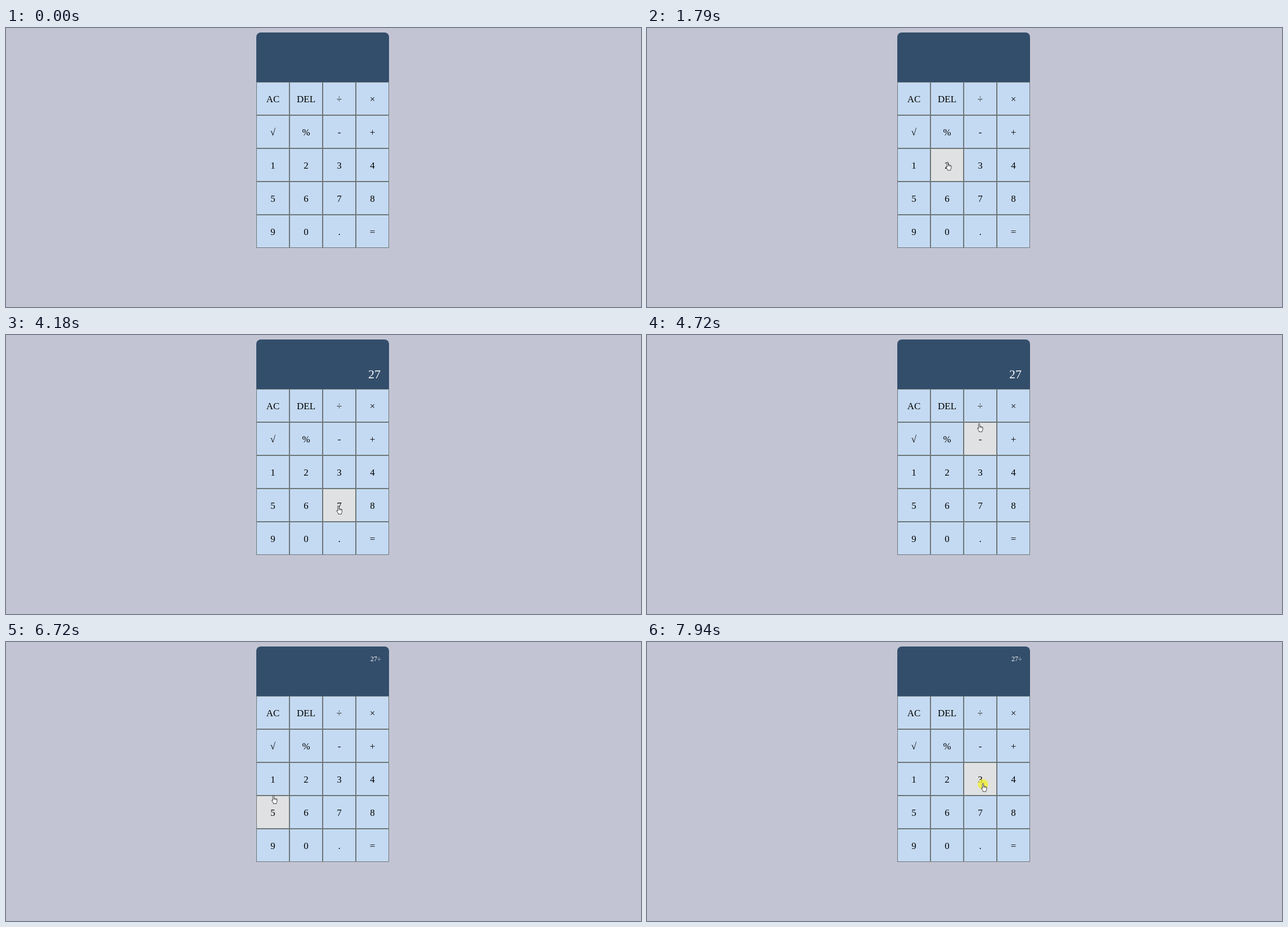
An HTML page for the animation above (8000 ms loop, 1129 px wide and 496 px high).

```html
<!DOCTYPE html>
<html lang="en">
<head>
<meta charset="utf-8">
<title>Calculator</title>
<style>
  html, body { margin: 0; width: 100%; height: 100%; overflow: hidden; background: #c3c4d3; }
  svg { display: block; width: 1129px; height: 496px; }
  text { font-family: "Liberation Serif", "Times New Roman", serif; }
  .key rect { fill: #c4daf2; stroke: #6d7678; stroke-width: 1; }
  .key text { font-size: 17px; text-anchor: middle; fill: #000; }
  .out { fill: #fff; text-anchor: end; }
  #arrow, #hand { fill: #fff; stroke: #111; stroke-width: .8; stroke-linejoin: round; stroke-linecap: round; }
</style>
</head>
<body>
<svg viewBox="0 0 1129 496">
  <path d="M445 97V16a8 8 0 0 1 8-8h220a8 8 0 0 1 8 8v81z" fill="#334e6b"/>
  <text id="previous" class="out" x="666.5" y="34" font-size="12"></text>
  <text id="current" class="out" x="666" y="77" font-size="22"></text>
  <g id="keys"></g>
  <g id="pointer">
    <circle id="click" cy="1.5" r="9.2" fill="#f2f02e" fill-opacity=".78"/>
    <path id="arrow" d="M.4 .4V10.6L2.8 8.4 4.4 12 6 11.3 4.4 7.8H7.6z"/>
    <g id="hand">
      <path d="M-1.2 8.3V.9a1.1 1.1 0 0 1 2.2 0V5.2Q2.6 4 2.9 5.6 4.4 4.6 4.7 6 6.4 5.4 6.4 7V10q0 1.6-1.1 2.8V14.4H-.2V13Q-1.5 11.5-3.2 8.5-2.8 6.8-1.2 8.3z"/>
      <path d="M1 5.2V7.6M2.9 5.6V7.6M4.7 6V7.8" fill="none" stroke-width=".6"/>
    </g>
  </g>
</svg>
<script>
const LOOP = 8000, FADE = 140;
const LEFT = 445, TOP = 96, SIZE = 59, COLS = 4, ROWS = 5;
const BASE = [196, 218, 242], LIT = [224, 225, 226];
const $ = id => document.getElementById(id);

// Each move: start, end, step count, then waypoints [step, x, y]
const moves = [
  [420, 690, 5, [0, 969, 483], [4, 739, 368]],
  [1030, 1790, 12, [0, 726, 358], [5, 482, 192], [7, 480, 208], [11, 534.5, 238.5]],
  [3180, 3840, 11, [0, 555, 250], [3, 589.5, 269.5], [10, 591, 304]],
  [4380, 5070, 11, [0, 591, 290], [5, 590.5, 124.5], [10, 590, 114]],
  [5530, 6300, 12, [0, 590, 110], [7, 580.5, 299.5], [11, 521.5, 318]],
  [6370, 7130, 12, [0, 514, 312], [5, 475.5, 273], [11, 476, 238.5]],
  [7190, 7940, 12, [0, 480, 250], [2, 495, 285], [6, 628, 298], [8, 612, 265], [11, 597.5, 251.5]]
];
const clicks = [[2520, 2650], [4050, 4180], [5070, 5230], [7940, LOOP]];

const keys = ["AC", "DEL", "÷", "×", "√", "%", "-", "+", ..."1234567890.="].map((label, i) => {
  const x = LEFT + i % COLS * SIZE, y = TOP + Math.floor(i / COLS) * SIZE;
  const key = make("g", { class: "key" }, $("keys"));
  const rect = make("rect", { x: x + .5, y: y + .5, width: SIZE - 1, height: SIZE - 1 }, key);
  make("text", { x: x + SIZE / 2, y: y + SIZE / 2 + 6 }, key).textContent = label;
  return rect;
});

function make(tag, attrs, parent) {
  const el = document.createElementNS("http://www.w3.org/2000/svg", tag);
  for (const name in attrs) el.setAttribute(name, attrs[name]);
  return parent.appendChild(el);
}

function position(t) {
  const move = moves.filter(m => m[0] <= t).pop();
  if (!move) return null;
  const [start, end, count, ...points] = move;
  const gap = (end - start) / (count - 1);
  const step = Math.min(count - 1, Math.floor((t - start) / gap + .05));
  const i = points.findIndex(p => p[0] >= step);
  const b = points[i], a = points[i - 1] || b;
  const u = a === b ? 0 : (step - a[0]) / (b[0] - a[0]);
  return [a[1] + (b[1] - a[1]) * u, a[2] + (b[2] - a[2]) * u];
}

function keyAt(t) {
  const p = position(t);
  if (!p) return -1;
  const col = Math.floor((p[0] - LEFT) / SIZE), row = Math.floor((p[1] - TOP) / SIZE);
  return col >= 0 && col < COLS && row >= 0 && row < ROWS ? row * COLS + col : -1;
}

// A key brightens while the pointer stays on it and resets at once
function glow(t, key) {
  let dwell = 0;
  while (dwell < FADE && keyAt(t - dwell - 5) === key) dwell += 5;
  return Math.min(1, dwell / FADE);
}

function show(id, on) {
  $(id).style.display = on ? "" : "none";
}

function draw(t) {
  const p = position(t), over = keyAt(t);
  keys.forEach((rect, i) => {
    const u = i === over ? glow(t, i) : 0;
    rect.style.fill = `rgb(${BASE.map((c, j) => Math.round(c + (LIT[j] - c) * u))})`;
  });
  show("pointer", p);
  if (p) $("pointer").setAttribute("transform", `translate(${p})`);
  show("arrow", over < 0);
  show("hand", over >= 0);
  show("click", clicks.some(c => t >= c[0] && t < c[1]));
  $("current").textContent = t < 2650 || t >= 5230 ? "" : t < 4180 ? "2" : "27";
  $("previous").textContent = t >= 5230 ? "27÷" : "";
}

const began = performance.now();
function tick() {
  draw((performance.now() - began) % LOOP);
  requestAnimationFrame(tick);
}
tick();
</script>
</body>
</html>
```
